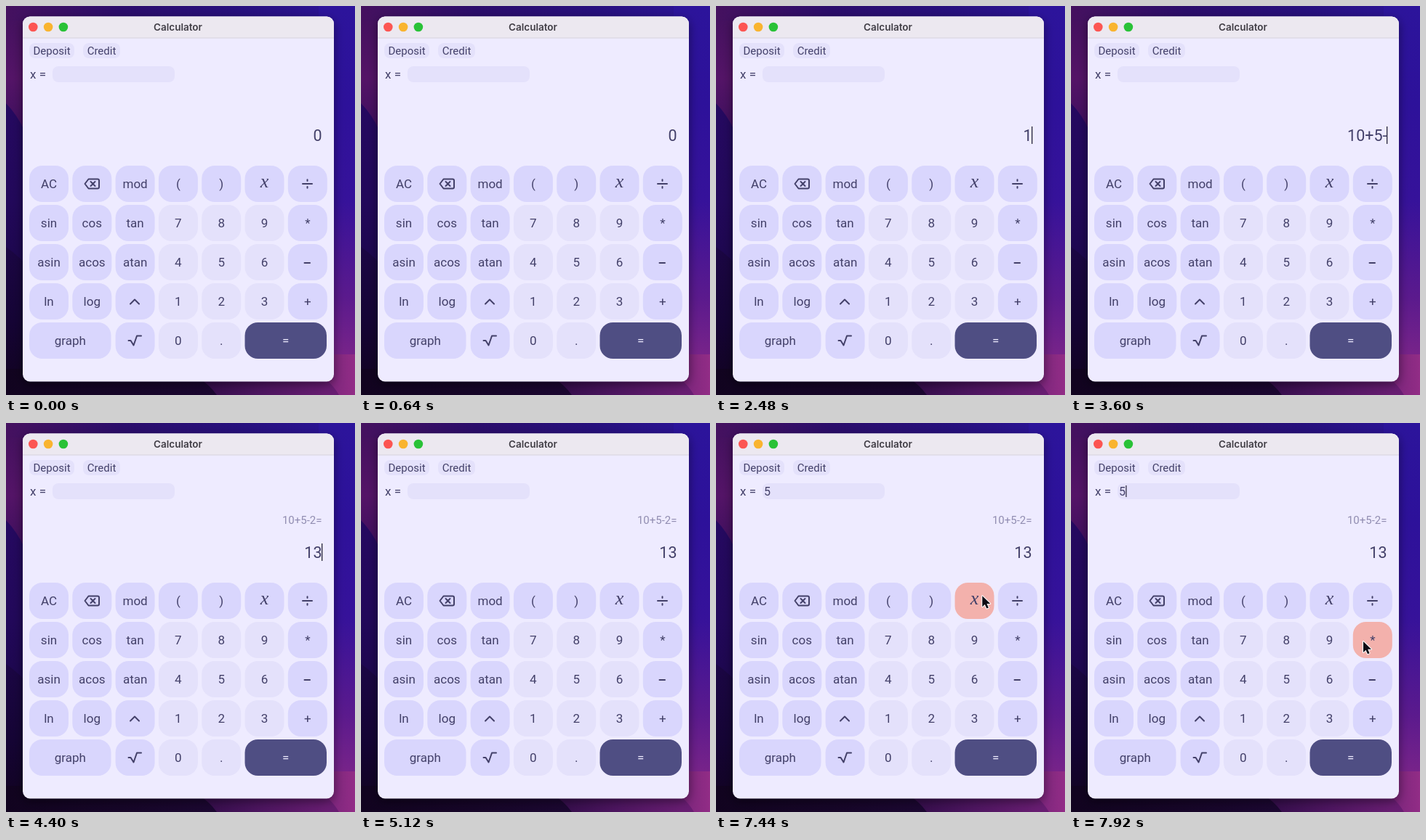
An HTML page with a canvas that plays this animation: 480x536 px, repeating every 8 s.

```html
<!DOCTYPE html>
<html lang="en">
<head>
<meta charset="utf-8">
<title>Calculator</title>
<style>
  html, body { margin: 0; width: 100%; height: 100%; overflow: hidden; background: #14052e; }
  canvas { display: block; }
</style>
</head>
<body>
<canvas id="stage" width="480" height="536"></canvas>
<script>
const ctx = document.getElementById('stage').getContext('2d');
const LOOP = 8000, STEP = 80;
const INK = '#434069', KEY = '#d9d6fd', SOFT = '#e4e1fb', HOVER = '#f3b1ac';

// Keypad
const ROWS = ['AC back mod ( ) x ÷', 'sin cos tan 7 8 9 *', 'asin acos atan 4 5 6 -',
              'ln log ^ 1 2 3 +', 'graph _ √ 0 . =']; 
const ICONS = {
  back: 'M113.5 238.5H126Q128 238.5 128 240.5V249.500Q128 251.500 126 251.500H113.500L108.500 245ZM116.500 242l6 6m0 -6l-6 6',
  '÷': 'M408 245H421M414.500 239.300v1.800M414.500 249v1.800',
  '-': 'M410.500 354H418',
  '^': 'M171 410.500L177 404.500L183 410.500',
  '√': 'M168.500 461H171.500L175.500 467.500L180 454.500H186',
};
const keys = ROWS.flatMap((row, r) => row.split(' ').map((label, c) => ({
  label, x: 32 + c * 59.3, y: 220 + r * 54,
  w: label === 'graph' || label === '=' ? 112.500 : 54, h: 50,
  fill: label === '=' ? '#4f4e83' : /^[\d.]$/.test(label) ? SOFT : KEY,
}))).filter(key => key.label !== '_');

// Typing: [time, display text, history line]
const TYPING = [[0, '0', ''], [2300, '1', ''], [2520, '10', ''], [2880, '10+', ''], [3160, '10+5', ''],
                [3480, '10+5-', ''], [3840, '10+5-2', ''], [4240, '13', '10+5-2=']];
const DISPLAY_CLICK = 1600, FIELD_CLICK = 6240, FIELD_TYPED = 6840;

// Each pass of the pointer: [time, x, y]
const PASSES = [
  [[880, 474, 206], [1280, 432.5, 190], [2080, 432.5, 190]],
  [[5280, 432.5, 190], [5920, 214, 101], [6080, 210.5, 99], [6480, 210.5, 99]],
  [[6960, 210.5, 99], [7360, 366, 238], [7600, 367, 239], [7920, 402, 301], [8000, 403, 302]],
];

const inside = (p, x, y, w, h) => p && p.x >= x && p.x <= x + w && p.y >= y && p.y <= y + h;

function pointerAt(t) {
  for (const pass of PASSES) {
    const i = pass.findIndex(k => k[0] > t);
    if (i < 1) continue;
    const [t0, x0, y0] = pass[i - 1], [t1, x1, y1] = pass[i];
    const u = (t - t0) / (t1 - t0), e = u * u * (3 - 2 * u);
    return { x: x0 + (x1 - x0) * e, y: y0 + (y1 - y0) * e };
  }
  return null;
}

function box(x, y, w, h, r, fill) {
  ctx.fillStyle = fill;
  ctx.beginPath();
  ctx.roundRect(x, y, w, h, r);
  ctx.fill();
}

function text(str, x, y, size, { align = 'center', color = INK, font = 'Roboto, sans-serif', style = '' } = {}) {
  ctx.font = `${style} ${size}px ${font}`;
  ctx.textAlign = align;
  ctx.fillStyle = color;
  ctx.fillText(str, x, y);
}

function gradient(x0, y0, x1, y1, ...colors) {
  const g = ctx.createLinearGradient(x0, y0, x1, y1);
  colors.forEach((c, i) => g.addColorStop(i / (colors.length - 1), c));
  return g;
}

function shape(d, fill) {
  ctx.fillStyle = fill;
  ctx.fill(new Path2D(d));
}

function stroke(d, color, width) {
  ctx.strokeStyle = color;
  ctx.lineWidth = width;
  ctx.stroke(new Path2D(d));
}

function drawWallpaper() {
  shape('M0 0H480V536H0Z', gradient(0, 0, 480, 0, '#45115f', '#2b0d6b', '#27107d', '#2c149b'));
  shape('M0 20H60V536H0Z', gradient(0, 20, 0, 180, '#45115f', '#541467', '#3b0e5c'));
  shape('M0 134Q30 165 40 220V536H0Z', gradient(0, 134, 0, 400, '#250960', '#22085a', '#1a0648'));
  shape('M0 332Q20 345 40 372V536H0Z', gradient(0, 332, 0, 536, '#1b0644', '#150435', '#11031f'));
  shape('M430 0H480V536H430Z', gradient(0, 0, 0, 536, '#2c149b', '#2d119a', '#36129a', '#5b1a8d', '#8b2a87'));
  shape('M0 500H480V536H0Z', gradient(0, 0, 480, 0, '#11031f', '#160528', '#1d0734', '#30104a'));
  shape('M262 510Q280 522 290 536H480V510Z', gradient(262, 0, 440, 0, '#310c48', '#4d1560', '#681d72'));
  shape('M424 505Q446 515 458 536H480V480H451Z', gradient(424, 0, 480, 0, '#6f2076', '#922d86'));
}

function drawWindow() {
  ctx.save();
  ctx.shadowColor = 'rgba(0,0,0,.45)';
  ctx.shadowBlur = 14;
  ctx.shadowOffsetY = 4;
  box(23, 14.5, 428, 503, 10, '#eeebff');
  ctx.restore();
  box(23, 14.5, 428, 30, [10, 10, 0, 0], '#ece8f0');
  box(23, 43.5, 428, 1, 0, '#d9d5df');
  ['#fc5552', '#f9b42f', '#29c237'].forEach((c, i) => box(31 + i * 20.8, 22.700, 12.6, 12.6, 6.3, c));
  text('Calculator', 236.500, 33.500, 13.5, { color: '#403d45', font: 'Inter, sans-serif', style: '600' });

  box(32, 51, 62, 21, 8, SOFT);
  box(106, 51, 51, 21, 8, SOFT);
  text('Deposit', 63, 66.5, 15);
  text('Credit', 131.500, 66.5, 15);
  text('x =', 33, 100, 17, { align: 'left' });
  box(64, 83, 168, 22, 8, SOFT);
}

function drawKeys(pointer) {
  for (const { label, x, y, w, h, fill } of keys) {
    box(x, y, w, h, 18, inside(pointer, x, y, w, h) ? HOVER : fill);
    if (ICONS[label]) stroke(ICONS[label], INK, 2);
    else if (label === 'x') text('x', x + w / 2, y + 30, 26, { font: '"Liberation Serif", serif', style: 'italic' });
    else text(label, x + w / 2, y + 31, 17, { color: label === '=' ? '#eeebff' : INK });
  }
}

function drawEntries(t) {
  const [since, value, history] = TYPING.findLast(step => step[0] <= t);
  const blinkOn = start => (t - start) % 1000 < 500;
  text(history, 434.5, 139, 15, { align: 'right', color: '#918db1' });
  text(value, 434.5, 186, 21.5, { align: 'right' });
  if (t >= DISPLAY_CLICK && t < FIELD_CLICK && blinkOn(Math.max(since, DISPLAY_CLICK)))
    box(434, 166, 1.3, 24, 0, '#252338');
  const typed = t >= FIELD_TYPED;
  if (typed) text('5', 66, 99.5, 16, { align: 'left' });
  if (t >= FIELD_CLICK && blinkOn(typed ? FIELD_TYPED : FIELD_CLICK))
    box(typed ? 75.3 : 66, 86, 1.2, 16, 0, '#252338');
}

function drawPointer(p) {
  if (!p) return;
  ctx.save();
  ctx.translate(p.x, p.y);
  if (inside(p, 32, 160, 410, 45) || inside(p, 64, 83, 168, 22)) {
    const beam = 'M-3 -7.500Q0 -7.500 0 -5.500Q0 -7.500 3 -7.500M0 -5.500V5.500M-3 7.500Q0 7.500 0 5.500Q0 7.500 3 7.500M-1.500 2.500H1.500';
    stroke(beam, '#fff', 3);
    stroke(beam, '#17151f', 1.4);
  } else {
    const arrow = 'M0 0V15L3.500 11.800L6 17.300L8.600 16.200L6.200 10.800H11Z';
    stroke(arrow, '#fff', 2);
    shape(arrow, '#0d0b14');
  }
  ctx.restore();
}

function frame(now) {
  const t = Math.floor(now % LOOP / STEP) * STEP;
  const pointer = pointerAt(t);
  ctx.lineCap = ctx.lineJoin = 'round';
  drawWallpaper();
  drawWindow();
  drawKeys(pointer);
  drawEntries(t);
  drawPointer(pointer);
  requestAnimationFrame(frame);
}
// The wide graph key fills two columns, so its row keeps a blank slot.
requestAnimationFrame(frame);
</script>
</body>
</html>
```
